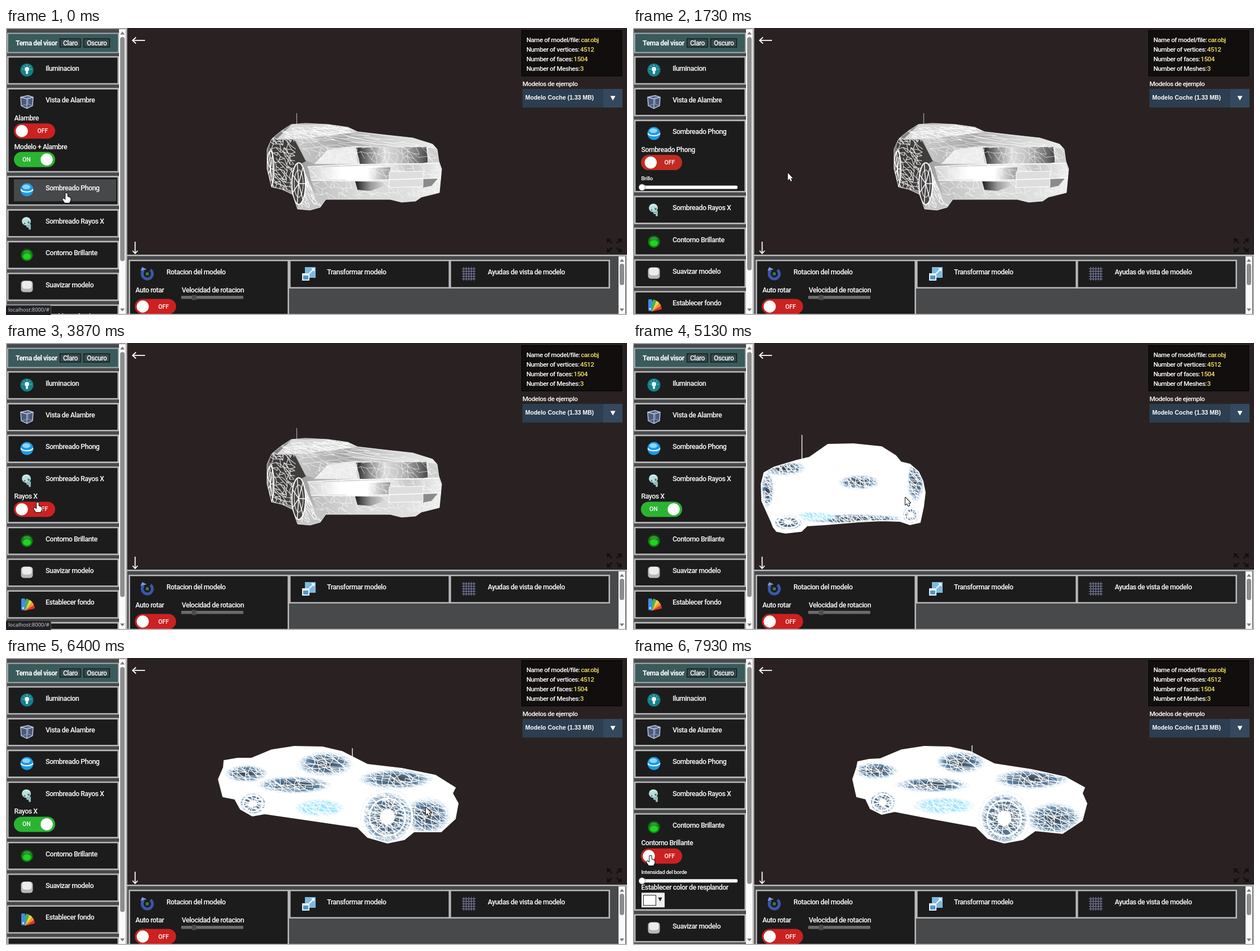
These frames come from a looping animation (1099x509 px, 8000 ms). An HTML page with a canvas:

```html
<!DOCTYPE html>
<html lang="es">
<head>
<meta charset="utf-8">
<title>Visor de modelos</title>
<style>
html, body { margin: 0; width: 100%; height: 100%; overflow: hidden; background: #2a2222; }
canvas { display: block; width: 1099px; height: 509px; }
</style>
</head>
<body>
<canvas id="stage" width="1099" height="509"></canvas>
<script>
const g = document.getElementById('stage').getContext('2d');
const LOOP = 8000, EDGE = '#b9b9b9', CARD = '#1c1c1c', PANEL = '#48494b';

// ---------- helpers ----------
const ramp = (t, a, b) => Math.min(1, Math.max(0, (t - a) / (b - a)));
const smooth = x => x * x * (3 - 2 * x);
const mix = (a, b, k) => a + (b - a) * k;
const mixAll = (a, b, k) => a.map((v, i) => mix(v, b[i], k));

let seed = 1;
const rnd = () => (seed = seed * 16807 % 2147483647) / 2147483647;

function rect(color, x, y, w, h, r = 0) {
  g.fillStyle = color;
  g.beginPath();
  g.roundRect(x, y, w, h, r);
  g.fill();
}
function trace(p, closed = true) {
  g.beginPath();
  for (let i = 0; i < p.length; i += 2) g.lineTo(p[i], p[i + 1]);
  if (closed) g.closePath();
}
function poly(color, ...p) {
  trace(p);
  g.fillStyle = color;
  g.fill();
}
function line(color, width, ...p) {
  trace(p, false);
  g.strokeStyle = color;
  g.lineWidth = width;
  g.stroke();
}
function oval(color, x, y, rx, ry = rx, width = 0) {
  g.beginPath();
  g.ellipse(x, y, rx, ry, 0, 0, 7);
  g[width ? 'strokeStyle' : 'fillStyle'] = color;
  g.lineWidth = width;
  width ? g.stroke() : g.fill();
}
function text(s, x, y, size = 12.4, color = '#fff', weight = 500) {
  g.font = `${weight} ${size}px Roboto, sans-serif`;
  g.letterSpacing = -0.04 * size + 'px';
  g.fillStyle = color;
  g.fillText(s, x, y);
}
function plain(s, x, y, font, color = '#fff') {
  g.font = font;
  g.letterSpacing = '0px';
  g.fillStyle = color;
  g.fillText(s, x, y);
}
function shade(x0, x1, ...colors) {
  const s = g.createLinearGradient(x0, 0, x1, 0);
  colors.forEach((c, i) => s.addColorStop(i / (colors.length - 1), c));
  return s;
}
function box(x, y, w, h, fill = CARD, edge = EDGE, b = 2.6) {
  rect(edge, x, y, w, h);
  rect(fill, x + b, y + b, w - 2 * b, h - 2 * b);
}
function triangle(color, x, y, w, h) {
  poly(color, x - w, y - h, x + w, y - h, x, y + h);
}

// ---------- widgets ----------
function toggle(x, y, on) {
  rect(`rgb(${mixAll([204, 33, 33], [43, 180, 50], on)})`, x, y - 13.5, 73, 27, 13.5);
  const font = '500 10.5px Roboto, sans-serif';
  if (on > 0.7) plain('ON', x + 15, y + 0.5, font);
  else plain('OFF', x + 41.5, y + 0.5, font);
  oval('#fff', x + 14 + 44 * on, y, 10.7);
}
function slider(y) {
  rect('#fff', 13, y - 3, 172, 6, 2);
  oval('#999', 16, y, 6);
  oval('#fff', 16, y, 5.2);
}
function scrollbar(x, top, bottom, from, to) {
  rect('#fafafa', x, top, 12, bottom - top);
  rect('#8d8d8d', x + 2, from, 8, to - from, 4);
  triangle('#777', x + 6, top + 7, 4, -2.5);
  triangle('#777', x + 6, bottom - 7, 4, 2.5);
}

// ---------- icons, centred on 0,0 ----------
const icons = {
  bulb() {
    oval('#16808a', 0, 0, 11.5);
    oval('#e8fbff', 0, -1.5, 4);
    rect('#e8fbff', -2, 2, 4, 5, 1);
    for (let a = 0; a < 5; a++) {
      const c = Math.cos(a * Math.PI / 4), s = -Math.sin(a * Math.PI / 4);
      line('#bdeef2', 1, c * 6, s * 6 - 1.5, c * 8, s * 8 - 1.5);
    }
  },
  cube() {
    poly('#4d5b78', -11, -8, 2, -11, 11, -8, 10, 7, 0, 12, -10, 7);
    line('#c3d2ee', 1.4, -11, -8, 2, -11, 11, -8, 10, 7, 0, 12, -10, 7, -11, -8, 0, -5, 11, -8);
    line('#c3d2ee', 1.2, 0, -5, 0, 12);
    line('#93a5cc', 1, 2, -11, 2, 4, -10, 7);
    line('#93a5cc', 1, 2, 4, 10, 7);
  },
  sphere() {
    oval('#1c9be6', 0, 0, 11.5);
    oval('#8ed4fa', -1, -5, 7, 4);
    g.beginPath();
    g.ellipse(0, -1, 10.5, 5, 0, 0.1, Math.PI - 0.1);
    g.strokeStyle = '#fff';
    g.lineWidth = 2;
    g.stroke();
  },
  skull() {
    oval('#b9dedb', -1, -3, 8, 7.5);
    rect('#a5cecb', -1, 2, 8, 6, 2);
    rect('#94bfbe', 3, 7, 4, 5, 2);
    oval('#547d7f', 3, -1, 2);
    oval('#547d7f', -4, 1, 1.5);
    line('#e9ffff', 1, -7, -6, -1, -9, 5, -6);
    line('#547d7f', 1, 0, 5, 6, 5);
  },
  glow() {
    oval('#123d12', 0, 0, 11.5);
    oval('#0e8a14', 0, 1, 10);
    oval('#1fd51f', 0, 3, 7, 5.5);
    oval('#3b8f3b', 0, -5, 6, 3);
  },
  stone() {
    rect('#b7b7b7', -10.5, -10, 21, 20, 5);
    rect('#ececec', -8.5, -10, 17, 14, 5);
  },
  fan() {
    ['#e5352b', '#f0932b', '#e8d44d', '#4caf50'].forEach((c, i) => {
      g.save();
      g.translate(-5, 9);
      g.rotate(1.35 - i * 0.33);
      rect(c, -3, -19, 6, 19, 1);
      g.restore();
    });
    rect('#3f8fe0', -10, -10, 7, 21, 2);
    oval('#fff', -6.5, 7, 1.5);
  },
  spin() {
    g.beginPath();
    g.arc(0, 0, 9, -0.9, 3.9);
    g.strokeStyle = '#3c56a8';
    g.lineWidth = 5;
    g.stroke();
    poly('#7f97dd', -12, -5, -9, -12, -1, -8);
    oval('#2f7d4a', 0, 0, 3);
  },
  resize() {
    rect('#7fb9de', -7, -12, 19, 19);
    rect('#e8f5fd', -12, -1, 13, 13);
    rect('#4f97c8', -10, 3, 9, 7);
    line('#fff', 2, 1, -1, 8, -8);
    poly('#fff', 10, -10, 10, -4, 4, -10);
  },
  grid() {
    for (let i = -9; i <= 9; i += 4.5) {
      line('#76769a', 1.3, i, -12, i, 12);
      line('#76769a', 1.3, -12, i, 12, i);
    }
  }
};
function icon(name, x, y) {
  g.save();
  g.translate(x, y);
  icons[name]();
  g.restore();
}

// ---------- timeline ----------
const path = [
  [0, 107, 293], [650, 107, 293], [900, 66, 243], [1550, 62, 243], [1700, 274, 257],
  [2300, 275, 258], [2650, 66, 249], [2980, 66, 249], [3130, 100, 312], [3350, 100, 312],
  [3700, 56, 283], [4450, 56, 283], [4560, 628, 285], [4640, 628, 285], [5130, 482, 274],
  [5650, 748, 268], [6400, 743, 265], [6600, 743, 265], [6850, 105, 340], [7250, 105, 340],
  [7700, 31, 351], [8000, 31, 351]
];
function along(keys, t) {
  let i = 1;
  while (i < keys.length - 1 && keys[i][0] < t) i++;
  const [a, b] = [keys[i - 1], keys[i]];
  return [a, b, smooth(ramp(t, a[0], b[0]))];
}
const slide = (t, at) => smooth(ramp(t, at, at + 500));
const within = (t, a, b) => t >= a && t < b;

const xrayOn = t => ramp(t, 4090, 4290);
const phongOn = t => ramp(t, 1710, 1990) - ramp(t, 2732, 2932);

// ---------- sidebar ----------
const cards = [
  { title: 'Iluminacion', icon: 'bulb' },
  { title: 'Vista de Alambre', icon: 'cube', extra: 99.7, open: t => 1 - slide(t, 150),
    body(y) {
      text('Alambre', 14.5, y + 54);
      toggle(14, y + 76.5, 0);
      text('Modelo + Alambre', 14.5, y + 105);
      toggle(14, y + 127, 1);
    } },
  { title: 'Sombreado Phong', icon: 'sphere', extra: 78.7,
    open: t => slide(t, 150) - slide(t, 3300), hover: t => t < 150,
    body(y, t) {
      text('Sombreado Phong', 14.5, y + 53.5);
      toggle(14, y + 76, phongOn(t));
      text('Brillo', 14.5, y + 105, 9.8);
      slider(y + 120);
    } },
  { title: 'Sombreado Rayos X', icon: 'skull', extra: 50.7,
    open: t => slide(t, 3300) - slide(t, 7000), hover: t => within(t, 3100, 3320),
    body(y, t) {
      text('Rayos X', 14.5, y + 53.5);
      toggle(14, y + 76, xrayOn(t));
    } },
  { title: 'Contorno Brillante', icon: 'glow', extra: 122.7,
    open: t => slide(t, 7000), hover: t => within(t, 6830, 7030),
    body(y) {
      text('Contorno Brillante', 14.5, y + 53.5);
      toggle(14, y + 76, 0);
      text('Intensidad del borde', 14.5, y + 105, 9.7);
      slider(y + 120);
      text('Establecer color de resplandor', 14.5, y + 132.5);
      rect('#efefef', 15, y + 141, 41, 26);
      box(18, y + 145, 23, 19, '#fff', '#222', 1);
      triangle('#222', 48, y + 153, 3.5, 3.5);
    } },
  { title: 'Suavizar modelo', icon: 'stone' },
  { title: 'Establecer fondo', icon: 'fan' },
  { title: '' }
];

function sidebar(t) {
  rect(PANEL, 0, 0, 214, 509);
  box(2, 8.5, 198, 36, '#3a5a5b', '#a4b0b0', 2);
  text('Tema del visor', 17, 27, 12.2, '#fff', 700);
  box(95, 18.5, 37.5, 16, '#36494a', '#0b1414', 1.2);
  box(137, 18.5, 47, 16, '#36494a', '#0b1414', 1.2);
  text('Claro', 101, 27, 12);
  text('Oscuro', 143, 27, 12);

  let y = 50, grown = 0;
  for (const c of cards) {
    const open = c.open ? c.open(t) : 0, hover = c.hover && c.hover(t);
    const more = (c.extra || 0) * open + (hover ? 2.7 : 0);
    const h = 50.3 + more;
    box(2, y, 198, h);
    if (hover) rect('#47484a', 14, y + 6, 181, 39);
    if (c.icon) icon(c.icon, 37, y + 24.5);
    text(c.title, 70, y + 22);
    if (open > 0) {
      g.save();
      g.beginPath();
      g.rect(0, y + 44, 197, h - 46.6);
      g.clip();
      c.body(y, t);
      g.restore();
    }
    y += 56.3 + more;
    grown += more;
  }
  scrollbar(200, 2, 507, 16, 16 + 242700 / (508 + grown));
  rect(EDGE, 0, 0, 214, 1.5);
  rect(EDGE, 0, 0, 1.5, 509);
  rect(EDGE, 0, 507, 214, 2);
  rect(EDGE, 211.5, 0, 3, 509);
}

// ---------- bottom panel ----------
function bottomPanel() {
  rect(PANEL, 214, 402, 885, 107);
  rect(EDGE, 214, 402, 885, 2.5);
  box(217, 411, 284, 110);
  box(501, 411, 285, 51);
  box(785, 411, 284, 51);
  icon('spin', 250, 436);
  icon('resize', 536, 436);
  icon('grid', 819, 436);
  text('Rotacion del modelo', 284, 433);
  text('Transformar modelo', 568, 433);
  text('Ayudas de vista de modelo', 852.5, 433);
  text('Auto rotar', 229, 465.5);
  text('Velocidad de rotacion', 311, 465.5);
  toggle(228, 494, 0);
  rect('#6b6b6b', 310, 475, 110, 5.5, 1);
  rect('#4d4d4d', 329, 473.5, 8, 9, 1);
  scrollbar(1084, 405, 507, 418, 456);
  rect(EDGE, 214, 507, 885, 2);
  rect(EDGE, 1097, 402, 2, 107);
}

// ---------- viewer ----------
function viewer() {
  line('#fff', 1.8, 246, 22, 224, 22);
  line('#fff', 1.8, 230, 16.5, 224, 22, 230, 27.5);
  line('#fff', 1.8, 228.5, 379, 228.5, 400);
  line('#fff', 1.8, 224, 395, 228.5, 400, 233, 395);
  for (const sx of [-1, 1]) for (const sy of [-1, 1]) {
    const x = 1076.5 + sx * 13, y = 385.5 + sy * 12;
    poly('#151010', x, y, x - sx * 8, y, x, y - sy * 8);
    line('#151010', 2.4, x, y, x - sx * 9, y - sy * 8);
  }
  box(912, 4, 178.5, 81.5, '#120e0e', '#050303', 1.2);
  [['Name of model/file:', 'car.obj', 1017.5], ['Number of vertices:', '4512', 1016],
   ['Number of faces:', '1504', 1004.5], ['Number of Meshes:', '3', 1016]].forEach(([k, v, x], i) => {
    text(k, 921, 22 + 17 * i, 11.6);
    text(v, x, 22 + 17 * i, 11.6, '#f3e667');
  });
  text('Modelos de ejemplo', 914, 100, 11.7);
  rect('#2c3e50', 914, 108, 144, 33);
  rect('#34495e', 1057, 108, 34, 33);
  plain('Modelo Coche (1.33 MB)', 919, 124.5, 'bold 10.5px "Liberation Sans", sans-serif');
  triangle('#fff', 1074, 124.5, 4.5, 4);
}

// ---------- car ----------
// Outline runs clockwise from the lower left; gaps are x, y, rx, ry; mast is x, top, bottom.
const quarter = {
  outline: [470,282, 462,250, 462,215, 470,197, 478,190, 488,182, 505,171, 530,169, 570,171, 605,176,
    622,184, 665,189, 720,195, 755,206, 763,215, 766,236, 771,250, 767,292, 735,300, 725,307,
    700,309, 680,304, 566,304, 556,318, 538,323, 516,321, 507,295, 488,286],
  gaps: [520,280,16,42, 468,250,8,32, 495,205,22,22, 690,200,60,10, 645,282,40,10, 485,255,20,25,
    560,235,20,14, 720,225,40,12],
  mast: [514.5, 151, 190]
};
const front = {
  outline: [245,318, 228,280, 227,250, 232,230, 250,220, 290,208, 312,203, 345,180, 390,179, 440,184,
    465,200, 474,211, 490,215, 505,228, 513,245, 517,265, 514,290, 508,318, 490,322, 472,316,
    440,315, 400,317, 340,322, 308,324, 298,334, 270,337, 254,334, 248,326],
  gaps: [275,318,26,14, 492,305,16,16, 265,222,38,12, 400,247,34,12, 390,312,85,8, 320,308,40,8,
    238,260,10,30, 500,245,14,35],
  mast: [299, 163, 206]
};
const side = {
  outline: [384,246, 376,215, 385,194, 386,182, 410,178, 434,178, 470,163, 510,157, 560,158, 595,166,
    640,189, 700,196, 760,208, 795,230, 790,240, 800,258, 795,285, 770,308, 722,308, 705,322,
    675,328, 640,318, 622,300, 540,288, 458,276, 436,280, 415,268, 405,250],
  gaps: [675,282,44,46, 437,258,24,20, 565,188,45,20, 690,215,60,16, 745,280,38,30, 555,266,40,14,
    425,205,35,14, 510,225,60,14],
  mast: [613, 160, 190]
};
const rest = {
  outline: [396,246, 389,215, 396,194, 398,184, 418,180, 437,179, 475,163, 515,157, 560,158, 597,166,
    640,188, 705,198, 765,211, 799,230, 795,240, 803,258, 795,288, 760,311, 712,306, 690,322,
    657,328, 628,320, 607,299, 530,285, 463,272, 440,277, 420,267, 412,250],
  gaps: [657,284,42,44, 442,256,24,20, 580,185,40,18, 705,215,60,16, 745,285,45,26, 550,262,50,14,
    430,200,35,14, 530,225,60,12],
  mast: [600, 155, 190]
};
const poses = [[4600, quarter], [5130, front], [5670, side], [6600, side], [7700, rest]];

// Broken triangle mesh over the quad a-b-c-d (x, y pairs, clockwise).
function mesh(q, nx, ny, color, width = 1, keep = 0.75) {
  const at = (i, j) => {
    const u = i / nx, v = j / ny;
    return [0, 1].map(k => mix(mix(q[k], q[2 + k], u), mix(q[6 + k], q[4 + k], u), v));
  };
  const grid = [];
  for (let j = 0; j <= ny; j++) {
    grid.push([]);
    for (let i = 0; i <= nx; i++) grid[j].push(at(i + (rnd() - 0.5) * 0.7, j + (rnd() - 0.5) * 0.7));
  }
  g.beginPath();
  for (let j = 0; j < ny; j++) for (let i = 0; i < nx; i++)
    for (const p of [grid[j][i + 1], grid[j + 1][i], grid[j + 1][i + 1]])
      if (rnd() < keep) {
        g.moveTo(...grid[j][i]);
        g.lineTo(...p);
      }
  g.strokeStyle = color;
  g.lineWidth = width;
  g.stroke();
}

function solidCar(phong) {
  seed = 77;
  const wire = `rgba(255,255,255,${mix(0.65, 0.35, phong)})`;
  line('#a9a5a5', 1.2, 514.5, 151, 514.5, 190);
  g.save();
  trace(quarter.outline);
  g.fillStyle = shade(462, 771, '#777', '#aaa', '#d2d2d2', '#dedede', '#e2e2e2');
  g.fill();
  g.clip();
  poly('#413d3d', 468,200, 508,194, 531,236, 512,246, 508,288, 475,282, 463,245);
  mesh([466,194, 512,194, 510,290, 464,282], 7, 14, 'rgba(255,255,255,.85)', 1.1, 0.6);
  poly('#dadada', 478,198, 506,171, 570,171, 622,185, 570,194, 512,197);
  mesh([488,180, 605,172, 625,188, 495,200], 13, 4, '#fff', 1, 0.7);
  poly(shade(520, 765, '#c9c9c9', '#a6a6a6', '#d4d4d4', '#eee'),
    512,198, 622,185, 750,203, 764,214, 620,209, 566,214, 545,240, 530,235);
  mesh([515,199, 625,187, 760,212, 545,232], 14, 5, wire, 1, 0.5);
  poly('#ececec', 545,241, 570,216, 618,211, 622,241);
  poly(shade(618, 748, '#1f1f1f', '#8d8d8d', '#dcdcdc', '#c4c4c4', '#8a8a8a', '#444'),
    620,212, 744,211, 747,238, 734,241, 626,241);
  poly('#cfcfcf', 747,212, 763,214, 766,238, 748,239);
  mesh([560,213, 763,212, 766,240, 545,241], 20, 3, wire, 1, 0.6);
  poly(shade(533, 771, '#cfcfcf', '#fff', '#fff', '#c8c8c8', '#f0f0f0'),
    534,247, 766,241, 771,266, 540,270);
  poly(shade(540, 770, '#bdbdbd', '#d8d8d8', '#dcdcdc', '#eee'),
    540,270, 771,266, 766,292, 728,301, 566,304, 548,296);
  poly(shade(600, 680, '#fff', '#fff', '#999'), 610,249, 680,247, 680,270, 604,270);
  mesh([535,246, 771,242, 767,298, 555,303], 24, 6, wire, 1, 0.5);
  poly(shade(618, 672, '#1b1b1b', '#999', '#ddd'), 618,272, 666,273, 672,279, 645,289, 622,287);
  poly('#8b8b8b', 738,267, 764,267, 753,280, 738,283);
  poly('#dedede', 678,255, 738,254, 738,281, 678,283);
  line('#fff', 1, 678,255, 738,254, 738,281, 678,283, 678,255);
  line('#fff', 1.3, 534,246, 620,242, 766,240);
  line('#fff', 1.3, 540,270, 618,271, 771,266);
  poly('#c6c6c6', 520,238, 546,292, 566,304, 556,318, 538,324, 516,322);
  mesh([524,245, 540,285, 560,318, 524,322], 5, 8, '#fff', 1, 0.5);
  [[468, 250, 6, 32], [518, 276, 12, 37]].forEach(([x, y, rx, ry]) => {
    oval('#4a4646', x, y, rx, ry);
    oval('#fff', x, y, rx, ry, 2);
    oval('#ddd', x, y, rx * 0.65, ry * 0.65, 1.2);
    spokes(x, y, rx, ry, 7);
  });
  g.restore();
  trace(quarter.outline);
  g.strokeStyle = 'rgba(255,255,255,.75)';
  g.lineWidth = 1;
  g.stroke();
}
function spokes(x, y, rx, ry, n) {
  for (let i = 0; i < n; i++) {
    const a = i * 2 * Math.PI / n;
    line('#fff', 1.4, x, y, x + Math.cos(a) * rx, y + Math.sin(a) * ry);
  }
}

function xrayCar(t) {
  const [[, a], [, b], k] = along(poses, t);
  const outline = mixAll(a.outline, b.outline, k), gaps = mixAll(a.gaps, b.gaps, k);
  const [mx, top, bottom] = mixAll(a.mast, b.mast, k);
  const xs = outline.filter((_, i) => i % 2 === 0), ys = outline.filter((_, i) => i % 2);
  const x0 = Math.min(...xs), x1 = Math.max(...xs), y0 = Math.min(...ys), y1 = Math.max(...ys);
  seed = 4242;
  line('#e8e8e8', 1.5, mx, top, mx, bottom);
  g.save();
  trace(outline);
  g.fillStyle = '#fff';
  g.fill();
  g.clip();
  for (let i = 0; i < gaps.length; i += 4) {
    const [x, y, rx, ry] = gaps.slice(i, i + 4);
    const fog = g.createRadialGradient(0, 0, 0, 0, 0, 1);
    fog.addColorStop(0, i === 20 ? '#a5e6fb' : '#36414c');
    fog.addColorStop(0.65, i === 20 ? '#a5e6fb' : '#5f83a3');
    fog.addColorStop(1, 'rgba(190,228,250,0)');
    g.save();
    g.translate(x, y);
    g.scale(rx * 1.15, ry * 1.15);
    oval(fog, 0, 0, 1);
    g.restore();
  }
  mesh([x0, y0, x1, y0 + 18, x1, y1, x0, y1 - 18], 38, 20, '#fff', 1.2, 0.8);
  mesh([x0, y0 - 8, x1, y0 + 22, x1, y1 + 8, x0, y1 - 30], 18, 22, 'rgba(255,255,255,.8)', 1, 0.7);
  for (const i of [0, 4]) {
    const [x, y, rx, ry] = gaps.slice(i, i + 4);
    oval('#fff', x, y, rx, ry, 4);
    oval('#fff', x, y, rx * 0.72, ry * 0.72, 3);
    oval('#fff', x, y, rx * 0.3, ry * 0.3);
    spokes(x, y, rx, ry, 11);
  }
  g.restore();
  trace(outline);
  g.strokeStyle = '#fff';
  g.lineWidth = 1.8;
  g.stroke();
}

// ---------- overlays ----------
function statusBar(t) {
  if (!(t < 900 || within(t, 3100, 4120) || within(t, 6850, 7600))) return;
  rect('#55585c', 0, 491.5, 80, 18, 2);
  rect('#202124', 0, 492.5, 79, 17, 2);
  plain('localhost:8000/#', 4, 501, '9.4px "Open Sans", sans-serif', '#d5d7da');
}
function cursor(t) {
  const [a, b, k] = along(path, t);
  const [, x, y] = mixAll(a, b, k);
  const hand = [-1.6,0, 1.6,0, 1.8,6, 7,8, 7.5,12, 5,17, -3,17, -7,11, -5.5,9, -1.8,11.5];
  const arrow = [0,0, 0,13, 3,10.3, 5,15, 7.3,14, 5.2,9.6, 9,9.4];
  g.save();
  g.translate(x, y);
  trace(x < 200 ? hand : arrow);
  g.lineJoin = 'round';
  g.strokeStyle = '#111';
  g.lineWidth = 2;
  g.stroke();
  g.fillStyle = '#fff';
  g.fill();
  g.restore();
}

function draw(now) {
  const t = now % LOOP;
  g.textBaseline = 'middle';
  rect('#2a2222', 0, 0, 1099, 509);
  viewer();
  if (t < 4200) solidCar(phongOn(t));
  else xrayCar(t);
  bottomPanel();
  sidebar(t);
  statusBar(t);
  cursor(t);
  requestAnimationFrame(draw);
}
requestAnimationFrame(draw);
</script>
</body>
</html>
```
